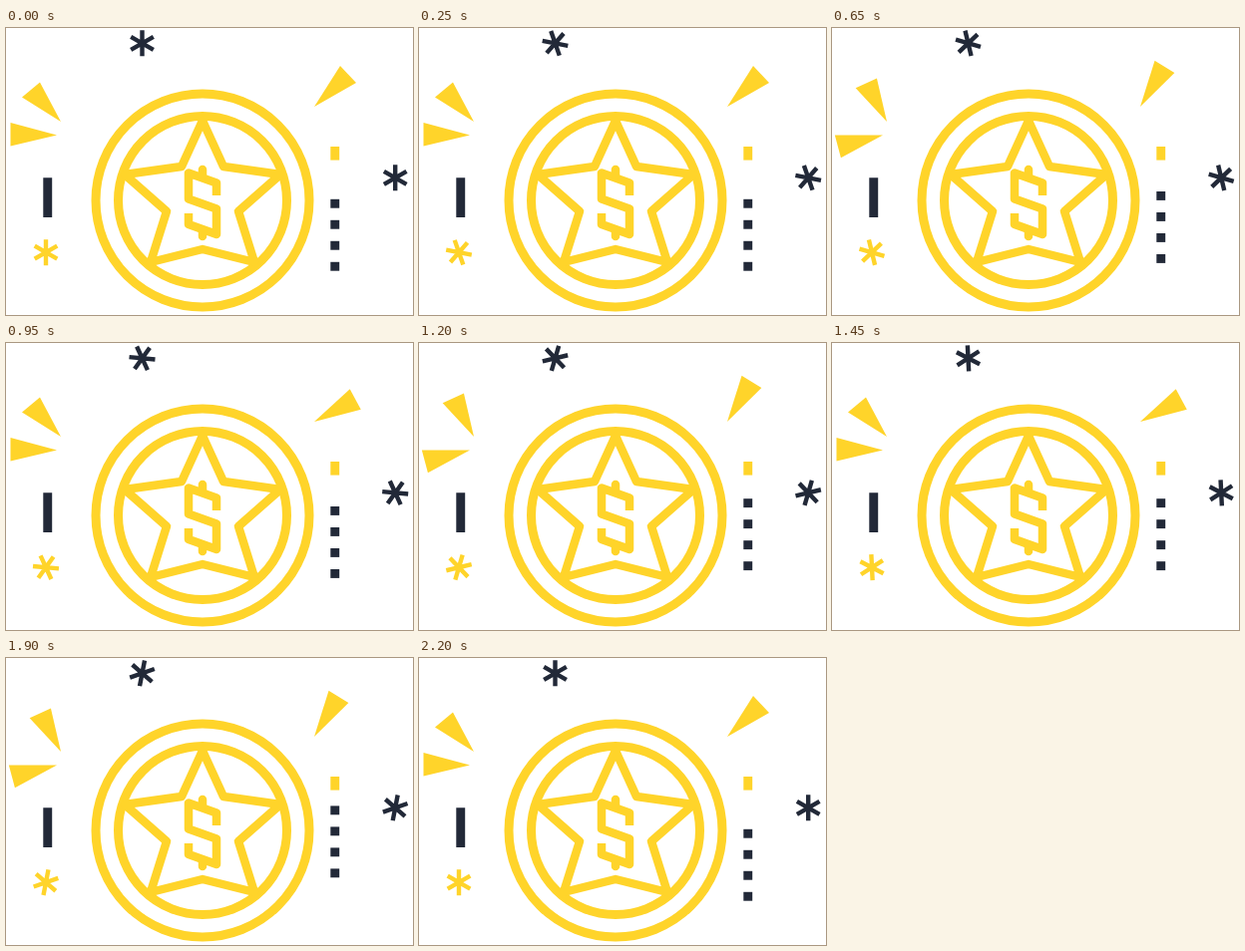
An HTML page for the animation above (2250 ms loop, 408x288 px).

```html
<!DOCTYPE html>
<html lang="en">
<head>
<meta charset="utf-8">
<title>Star coin</title>
<style>
  html, body { margin: 0; width: 100%; height: 100%; overflow: hidden; background: #fff; }
  svg { display: block; width: 408px; height: 288px; }
  .gold { fill: #ffd42a; }
  .ink { fill: #222938; }
  .line { fill: none; stroke: #ffd42a; stroke-linejoin: round; }
  .star { stroke-width: 4.4; }
</style>
</head>
<body>
<svg viewBox="0 0 408 288">
  <defs>
    <path id="asterisk" d="M0-13V13M-11.3-6.5L11.3 6.5M-11.3 6.5L11.3-6.5"/>
  </defs>

  <g class="line" stroke-width="9">
    <circle cx="197" cy="173" r="107"/>
    <circle cx="197" cy="173" r="84.5"/>
    <path stroke-width="8.5" d="M197 93L218 139L275 147L233 184L249 235L197 222L145 235L161 184L119 147L176 139Z"/>
    <path stroke-width="8.5" d="M211 168V155.500L183 145.500V171.500L211 181.500V207L183 197V186"/>
    <path stroke-width="8.500" stroke-linecap="round" d="M197 142V148M197 203V209"/>
  </g>

  <path class="ink" d="M37.300 150.300h8.900v39.700h-8.900z"/>
  <path class="gold" d="M325.300 119h8.900v13.600h-8.900z"/>
  <g id="dots" class="ink"></g>

  <g class="gold">
    <path id="rayUp" d="M16 69.500L34 54.500L55 94Z"/>
    <path id="rayLow" d="M4.500 95V118.500L51 107.500Z"/>
    <path id="rayRight" d="M335 38L351 55L309 79Z"/>
  </g>
  <g id="stars" class="star"></g>
</svg>
<script>
  const LOOP = 2250, FRAME = 50, TURN = 2200, BEAT = 350;
  const GOLD = '#ffd42a', INK = '#222938';
  const RIGHT_TILT = [0, -15, 15, -15, 15, -15, 0];
  const STARS = [[136.5, 15.3, INK], [390.2, 150.3, INK], [40, 225.2, GOLD]];

  const byId = id => document.getElementById(id);

  function add(parent, tag, attrs) {
    const node = document.createElementNS('http://www.w3.org/2000/svg', tag);
    for (const key in attrs) node.setAttribute(key, attrs[key]);
    return parent.appendChild(node);
  }

  const dots = byId('dots');
  for (let i = 0; i < 4; i++) {
    add(dots, 'rect', { x: 325.3, y: 171.8 + i * 21, width: 8.9, height: 8.9 });
  }

  const stars = STARS.map(([x, y, color]) => {
    const holder = add(byId('stars'), 'g', { transform: `translate(${x} ${y})` });
    return add(holder, 'use', { href: '#asterisk', stroke: color });
  });

  function tilt(id, angle, x, y) {
    byId(id).setAttribute('transform', `rotate(${angle} ${x} ${y})`);
  }

  function draw(t) {
    const spin = 360 * t / TURN;
    stars.forEach(star => star.setAttribute('transform', `rotate(${spin})`));

    const lift = Math.floor(4 * t / TURN) % 4 * 7.8;
    dots.setAttribute('transform', `translate(0 ${-lift})`);

    const beat = Math.floor(t / BEAT);
    const spread = beat % 2 * 15;
    tilt('rayUp', spread, 55, 94);
    tilt('rayLow', -spread, 51, 107.5);
    tilt('rayRight', RIGHT_TILT[beat], 309, 79);
  }

  const start = performance.now();
  function tick() {
    const t = (performance.now() - start) % LOOP;
    draw(Math.floor(t / FRAME) * FRAME);
    requestAnimationFrame(tick);
  }
  tick();
</script>
</body>
</html>
```
